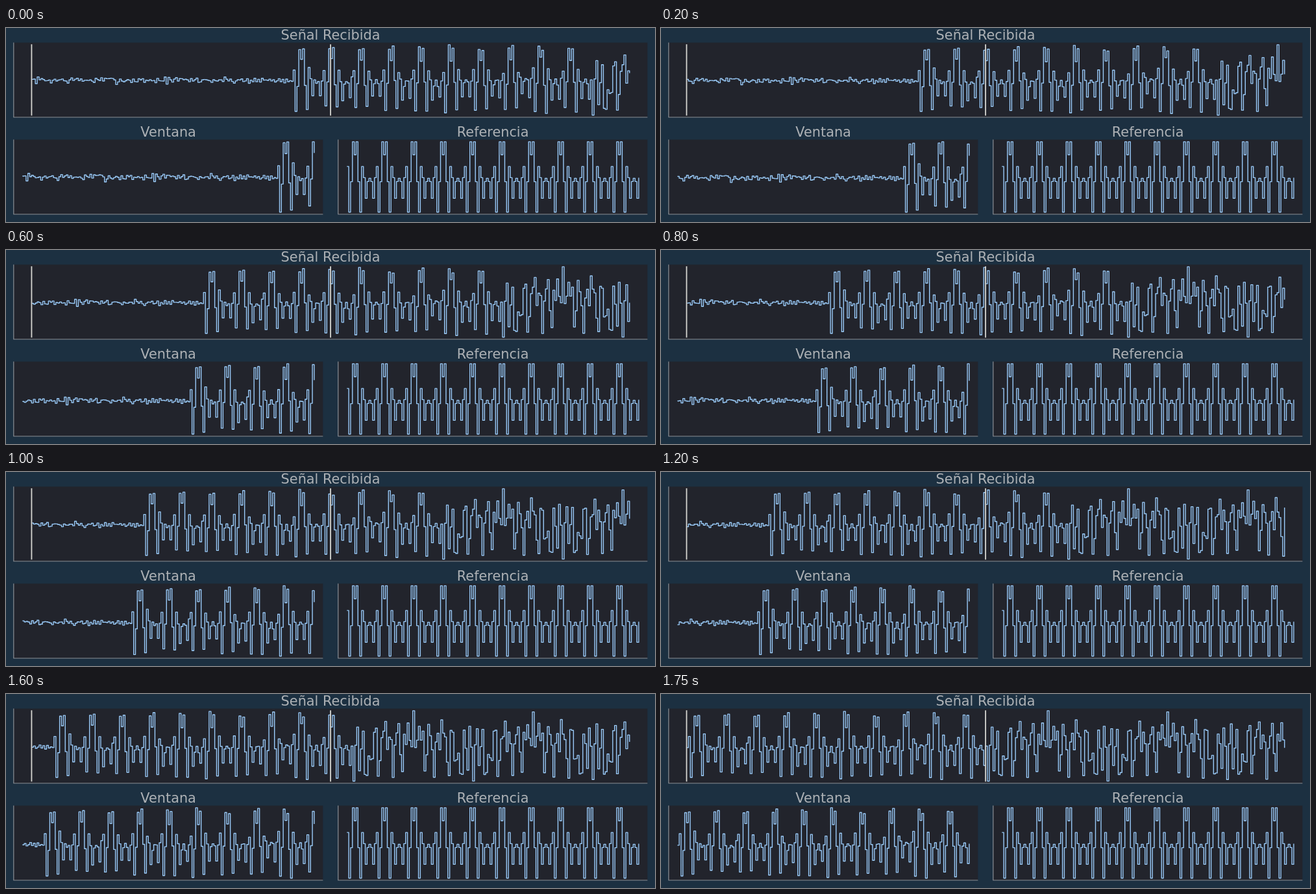
These frames come from a looping animation (1000x300 px, 2150 ms). An HTML page with a canvas:

```html
<!DOCTYPE html>
<html lang="es">
<head>
<meta charset="utf-8">
<title>Señal Recibida</title>
<style>
html, body { margin: 0; width: 100%; height: 100%; overflow: hidden; background: #1c3041; }
canvas { display: block; }
</style>
</head>
<body>
<canvas id="stage" width="1000" height="300"></canvas>
<script>
const ctx = document.getElementById('stage').getContext('2d');
const LOOP = 2150, TICK = 50, HOP = 4, LEAD = 140, VIEW = 321, WIN = 161;
const NOISE = 0.015;

// IEEE 802.11 preamble: subcarrier signs, symmetric around the empty centre
const shortCarriers = '+-+--+0--++++';
const longCarriers = '++--++-+-++++++--++-+-++++0+--++-+-+-----++--+-+-++++';

// Sum wave(angle) over the carriers, as a 64-point inverse transform
function synth(carriers, spacing, n, wave) {
  const mid = (carriers.length - 1) / 2;
  let sum = 0;
  [...carriers].forEach((c, i) => {
    if (c === '0') return;
    const value = wave(2 * Math.PI * (i - mid) * spacing * n / 64);
    sum += c === '+' ? value : -value;
  });
  return sum / 64;
}

const shortSample = n =>
  Math.sqrt(13 / 6) * synth(shortCarriers, 4, n, a => Math.cos(a) - Math.sin(a));
const longSample = n => synth(longCarriers, 1, n, Math.cos);

let seed = 7;
function rand() {
  seed = (seed * 1664525 + 1013904223) % 4294967296;
  return seed / 4294967296;
}
const noise = () => (rand() + rand() + rand() - 1.5) * NOISE;

function cleanSample(i) {
  if (i < 0) return 0;
  return i < 160 ? shortSample(i) : longSample(i - 192);
}

const reference = Array.from({ length: 160 }, (_, i) => shortSample(i));
const signal = Array.from({ length: LEAD + 320 }, (_, i) => cleanSample(i - LEAD) + noise());

const panels = {
  signal: { title: 'Señal Recibida', x: 11.8, y: 22.6, w: 976.6, h: 115.4 },
  win: { title: 'Ventana', x: 11.8, y: 172.6, w: 476.6, h: 115.4 },
  ref: { title: 'Referencia', x: 511.8, y: 172.6, w: 476.6, h: 115.4 }
};

function line(color, width, points) {
  ctx.strokeStyle = color;
  ctx.lineWidth = width;
  ctx.beginPath();
  points.forEach(([x, y]) => ctx.lineTo(x, y));
  ctx.stroke();
}

function drawPanel({ title, x, y, w, h }, data, marks = []) {
  ctx.fillStyle = '#22242c';
  ctx.fillRect(x, y, w, h);

  // Autoscale with a margin of 3% on each side
  const mx = w * 0.03 / 1.06, my = h * 0.03 / 1.06;
  const lo = Math.min(...data), hi = Math.max(...data);
  const px = i => x + mx + i / (data.length - 1) * (w - 2 * mx);
  const py = v => y + my + (hi - v) / (hi - lo) * (h - 2 * my);

  const steps = [];
  data.forEach((v, i) => {
    if (i) steps.push([px(i), py(data[i - 1])]);
    steps.push([px(i), py(v)]);
  });
  line('#9acbfa', 1.39, steps);
  marks.forEach(i => line('#d6d6d2', 1.8, [[px(i), py(hi) - 0.7], [px(i), py(lo) + 0.7]]));

  line('#8b9096', 1.2, [[x, y], [x, y + h], [x + w, y + h]]);

  ctx.fillStyle = '#adb1b5';
  ctx.fillText(title, x + w / 2, y - 4.6);
}

function draw(time) {
  const tick = Math.floor(time % LOOP / TICK);
  const start = Math.min(tick * HOP, signal.length - VIEW);
  ctx.fillStyle = '#1c3041';
  ctx.fillRect(0, 0, 1000, 300);
  ctx.font = '20.83px "DejaVu Sans", sans-serif';
  ctx.textAlign = 'center';
  ctx.lineJoin = 'round';
  drawPanel(panels.signal, signal.slice(start, start + VIEW), [0, WIN - 1]);
  drawPanel(panels.win, signal.slice(start, start + WIN));
  drawPanel(panels.ref, reference);
}

const begin = performance.now();
function loop() {
  draw(performance.now() - begin);
  requestAnimationFrame(loop);
}
loop();
</script>
</body>
</html>
```
